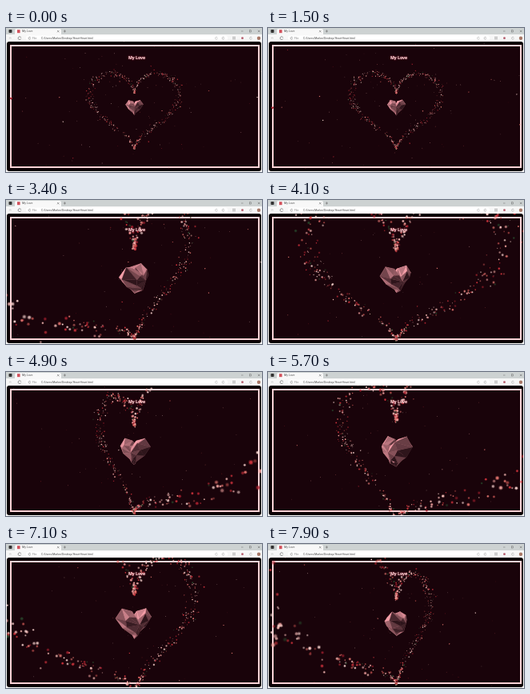
These frames come from a looping animation (320x180 px, 8 s). An HTML page with a canvas:

```html
<!DOCTYPE html>
<html lang="en">
<head>
<meta charset="utf-8">
<title>My Love</title>
<style>
html, body { margin: 0; width: 100%; height: 100%; overflow: hidden; background: #f7f7f7; }
canvas { display: block; width: 100vw; height: 100vh; }
</style>
</head>
<body>
<canvas id="stage"></canvas>
<script>
const W = 320, H = 180, LOOP = 8000, STEP = 100;
const CX = 160.5, CY = 99, FOCAL = 106;
const canvas = document.getElementById('stage');
const g = canvas.getContext('2d');
const dpr = window.devicePixelRatio || 1;
canvas.width = W * dpr;
canvas.height = H * dpr;

// time, camera yaw, camera pitch, zoom, turn of the crystal
const KEYS = [
  [0, 0, 0, 1, 0.05],
  [1500, -0.02, 0, 1, 0.12],
  [2300, -0.33, 0.03, 1.13, -0.08],
  [3400, -0.58, 0.35, 2.04, -0.95],
  [4900, 0.78, 0.18, 1.76, 0.4],
  [6400, 0.05, 0.23, 2.29, 0.65],
  [7900, -0.78, 0.14, 1.65, -1.15]
];

function seeded(seed) {
  return () => {
    seed = (seed + 0x6D2B79F5) | 0;
    let r = Math.imul(seed ^ seed >>> 15, 1 | seed);
    r = r + Math.imul(r ^ r >>> 7, 61 | r) ^ r;
    return ((r ^ r >>> 14) >>> 0) / 4294967296;
  };
}
const rnd = seeded(41);
const spread = () => rnd() + rnd() + rnd() - 1.5;
const clamp = (v, a, b) => Math.min(b, Math.max(a, v));

function slope(i, c) {
  if (i === 0 || i === KEYS.length - 1) return 0;
  const a = KEYS[i - 1], b = KEYS[i + 1];
  return (b[c] - a[c]) / (b[0] - a[0]);
}

function track(t, c) {
  let i = 0;
  while (i < KEYS.length - 2 && t > KEYS[i + 1][0]) i++;
  const a = KEYS[i], b = KEYS[i + 1], d = b[0] - a[0];
  const u = clamp((t - a[0]) / d, 0, 1), v = 1 - u;
  return (1 + 2 * u) * v * v * a[c] + u * v * v * d * slope(i, c)
    + u * u * (3 - 2 * u) * b[c] - u * u * v * d * slope(i + 1, c);
}

function heart(a) {
  const h = 13 * Math.cos(a) - 5 * Math.cos(2 * a) - 2 * Math.cos(3 * a) - Math.cos(4 * a);
  return [16 * Math.sin(a) ** 3, h > 5 ? 5 + (h - 5) * 1.12 : h];
}

const TINTS = ['#f3a3a0', '#d8363f', '#ffd9d4', '#b04a48', '#e87872', '#a92230', '#f6b9b4', '#27462b'];

const sparks = Array.from({ length: 560 }, () => {
  const a = rnd() * Math.PI * 2;
  const [x, y] = heart(a);
  const s = 0.7 + 3.6 * Math.abs(Math.sin(a)) ** 1.5;
  return {
    x: x * 3.5 + spread() * s,
    y: y * 3.15 + 2 + spread() * s,
    z: spread() * s * 1.3,
    r: 0.25 + rnd() * 0.35,
    tint: TINTS[Math.floor(rnd() * TINTS.length)],
    phase: rnd() * 6.28
  };
});

const stars = Array.from({ length: 150 }, () => ({
  x: (rnd() - 0.5) * 420,
  y: (rnd() - 0.5) * 300,
  z: (rnd() - 0.5) * 300 - 40,
  r: 0.25 + rnd() * 0.4,
  tint: TINTS[Math.floor(rnd() * 7)],
  phase: rnd() * 6.28,
  heart: rnd() < 0.15
}));

// Faceted heart: rim, front and back rings, two centre points
const N = 12;
const crystal = (() => {
  const pts = [], faces = [];
  const ring = (k, z) => {
    for (let i = 0; i < N; i++) {
      const [x, y] = heart(i / N * Math.PI * 2);
      const j = z ? 1.1 : 0.2;
      pts.push([x * 0.69 * k + spread() * j, (y + 1.5) * 0.63 * k + spread() * j, z + spread() * j]);
    }
  };
  ring(1, 0);
  ring(0.62, 6);
  ring(0.62, -6);
  pts.push([0.8, 0.5, 7.5], [-0.5, 0, -7.5]);
  const add = (...f) => faces.push({ f, glow: rnd() });
  for (let i = 0; i < N; i++) {
    const j = (i + 1) % N;
    [1, 2].forEach(side => {
      const o = N * side;
      add(i, j, o + i);
      add(j, o + j, o + i);
      add(o + i, o + j, 3 * N + side - 1);
    });
  }
  return { pts, faces };
})();

function turn(x, y, z, yaw, pitch) {
  const c = Math.cos(yaw), s = Math.sin(yaw);
  const px = x * c - z * s, pz = x * s + z * c;
  const cp = Math.cos(pitch), sp = Math.sin(pitch);
  return [px, y * cp - pz * sp, y * sp + pz * cp];
}

function project(p, cam) {
  const d = cam.dist - p[2];
  if (d < 7) return null;
  const m = FOCAL / d;
  return [CX + p[0] * m, CY - p[1] * m, m];
}

function disc(x, y, r, color) {
  g.fillStyle = color;
  g.beginPath();
  g.arc(x, y, r, 0, Math.PI * 2);
  g.fill();
}

function box(x, y, w, h, color) {
  g.fillStyle = color;
  g.fillRect(x, y, w, h);
}

function line(color, width, ...p) {
  g.strokeStyle = color;
  g.lineWidth = width;
  g.beginPath();
  for (let i = 0; i < p.length; i += 2) g.lineTo(p[i], p[i + 1]);
  g.stroke();
}

function label(text, x, y, font, color, align = 'left') {
  g.font = font;
  g.fillStyle = color;
  g.textAlign = align;
  g.textBaseline = 'middle';
  g.fillText(text, x, y);
}

function round(x, y, w, h, r, color) {
  g.fillStyle = color;
  g.beginPath();
  g.roundRect(x, y, w, h, r);
  g.fill();
}

function ringMark(x, y, r, color) {
  g.strokeStyle = color;
  g.lineWidth = 0.6;
  g.beginPath();
  g.arc(x, y, r, 0.4, 6);
  g.stroke();
}

function drawBrowser() {
  box(0, 0, W, H, '#f7f7f7');
  box(0, 0, W, 8, '#cdd2d2');
  round(3.5, 2, 4, 4, 0.8, '#333');
  round(11, 1, 58, 8, [2, 2, 0, 0], '#f8f8f8');
  box(14, 2.2, 3.6, 4, '#d2525c');
  label('My Love', 20, 4.4, '3.6px Roboto, sans-serif', '#555');
  line('#555', 0.5, 64, 3, 66.4, 5.4);
  line('#555', 0.5, 66.4, 3, 64, 5.4);
  line('#555', 0.5, 71.8, 4, 75, 4);
  line('#555', 0.5, 73.4, 2.4, 73.4, 5.6);
  line('#666', 0.5, 294, 4, 296.5, 4);
  g.strokeRect(304.5, 2.8, 2.2, 2.2);
  line('#555', 0.5, 315, 2.8, 317.4, 5.2);
  line('#555', 0.5, 317.4, 2.8, 315, 5.2);

  round(25, 9.4, 252, 6.8, 3.2, '#fff');
  line('#bbb', 0.6, 7, 12.7, 4, 12.7, 5.4, 11.3);
  ringMark(17, 12.7, 1.9, '#555');
  ringMark(29.5, 12.7, 1.4, '#777');
  label('File', 33, 12.9, '3.3px Roboto, sans-serif', '#777');
  label('C:/Users/Marlon/Desktop/Heart-Heart.html', 44, 12.9, '3.35px Roboto, sans-serif', '#444');
  ringMark(263, 12.7, 1.4, '#aaa');
  ringMark(271.5, 12.7, 1.4, '#999');
  line('#777', 0.6, 283, 11.5, 287, 11.5);
  line('#777', 0.6, 283, 13.5, 287, 13.5);
  disc(295.5, 12.7, 1.4, '#b45b6b');
  ringMark(306, 12.7, 1.4, '#999');
  disc(316, 12.7, 2.2, '#a87868');
}

function drawPage() {
  round(1, 17, 318, 162, 3, '#0b0003');
  box(5, 21, 312, 154, '#19030a');
  g.strokeStyle = '#ffd3d6';
  g.lineWidth = 2;
  g.strokeRect(6, 22, 310, 152);
}

function drawDot(p, r, tint, alpha) {
  const size = clamp(r * p[2], 0.38, 2.5);
  g.globalAlpha = alpha;
  if (size > 1) {
    g.globalAlpha = alpha * 0.35;
    disc(p[0], p[1], size * 1.25, tint);
    g.globalAlpha = alpha * 0.9;
    disc(p[0], p[1], size * 0.8, tint);
  } else {
    disc(p[0], p[1], size, tint);
  }
  g.globalAlpha = 1;
}

function drawHeartlet(p, r, tint) {
  const s = clamp(r * p[2] * 1.7, 0.7, 2.2);
  g.fillStyle = tint;
  g.beginPath();
  for (let i = 0; i < 20; i++) {
    const [x, y] = heart(i / 20 * Math.PI * 2);
    g.lineTo(p[0] + x * s / 15, p[1] - y * s / 15);
  }
  g.fill();
}

function drawStars(t, cam) {
  for (const s of stars) {
    const y = s.y + 4 * Math.sin(t / 1300 + s.phase);
    const p = project(turn(s.x, y, s.z, cam.yaw, cam.pitch), cam);
    if (!p || p[2] > 4) continue;
    if (s.heart) drawHeartlet(p, s.r, s.tint);
    else drawDot(p, s.r * 0.8, s.tint, 0.6 + 0.3 * Math.sin(t / 400 + s.phase));
  }
}

function drawSparks(t, cam) {
  for (const s of sparks) {
    const w = t / 500 + s.phase;
    const q = turn(s.x + 0.5 * Math.sin(w), s.y + 0.5 * Math.cos(w), s.z, cam.yaw, cam.pitch);
    const p = project(q, cam);
    if (p) drawDot(p, s.r * 1.15, s.tint, 0.75 + 0.25 * Math.sin(w * 1.7));
  }
}

function shade(n, glow) {
  const v = clamp(0.08 + 0.5 * (1 - n[2]) + 0.38 * (n[1] - n[0]) + 0.42 * glow, 0.05, 1);
  const mix = (a, b) => Math.round(a + (b - a) * v);
  return `rgb(${mix(36, 244)},${mix(14, 158)},${mix(20, 168)})`;
}

function drawCrystal(t, cam) {
  const beat = 0.98 + 0.05 * Math.sin(t / 180);
  const pts = crystal.pts.map(p => turn(p[0] * beat, p[1] * beat, p[2] * beat, track(t, 4), cam.pitch));
  const seen = [];
  for (const { f, glow } of crystal.faces) {
    const [a, b, c] = f.map(i => pts[i]);
    const u = b.map((v, i) => v - a[i]), w = c.map((v, i) => v - a[i]);
    let n = [u[1] * w[2] - u[2] * w[1], u[2] * w[0] - u[0] * w[2], u[0] * w[1] - u[1] * w[0]];
    const len = Math.hypot(...n) || 1;
    const out = n[0] * (a[0] + b[0] + c[0]) + n[1] * (a[1] + b[1] + c[1]) + n[2] * (a[2] + b[2] + c[2]);
    n = n.map(v => v / len * (out < 0 ? -1 : 1));
    seen.push({ z: a[2] + b[2] + c[2], color: shade(n, glow), p: [a, b, c].map(q => project(q, cam)) });
  }
  seen.sort((a, b) => a.z - b.z);
  g.lineJoin = 'round';
  for (const face of seen) {
    g.fillStyle = g.strokeStyle = face.color;
    g.lineWidth = 0.3;
    g.beginPath();
    face.p.forEach(p => g.lineTo(p[0], p[1]));
    g.closePath();
    g.fill();
    g.stroke();
  }
}

function draw(now) {
  const raw = now % LOOP;
  const t = raw < 2 * STEP ? 0 : Math.floor(raw / STEP) * STEP;
  const cam = { yaw: track(t, 1), pitch: track(t, 2), dist: FOCAL / track(t, 3) };
  g.setTransform(dpr, 0, 0, dpr, 0, 0);
  drawBrowser();
  drawPage();
  g.save();
  g.beginPath();
  g.roundRect(1, 17, 318, 162, 3);
  g.clip();
  drawStars(t, cam);
  drawCrystal(t, cam);
  drawSparks(t, cam);
  g.shadowColor = '#e0405a';
  g.shadowBlur = 2 * dpr;
  label('My Love', 163.5, 38, 'bold 5.2px "Open Sans", sans-serif', '#ffe6e4', 'center');
  g.restore();
}

const start = performance.now();
function tick() {
  draw(performance.now() - start);
  requestAnimationFrame(tick);
}
tick();
</script>
</body>
</html>
```
